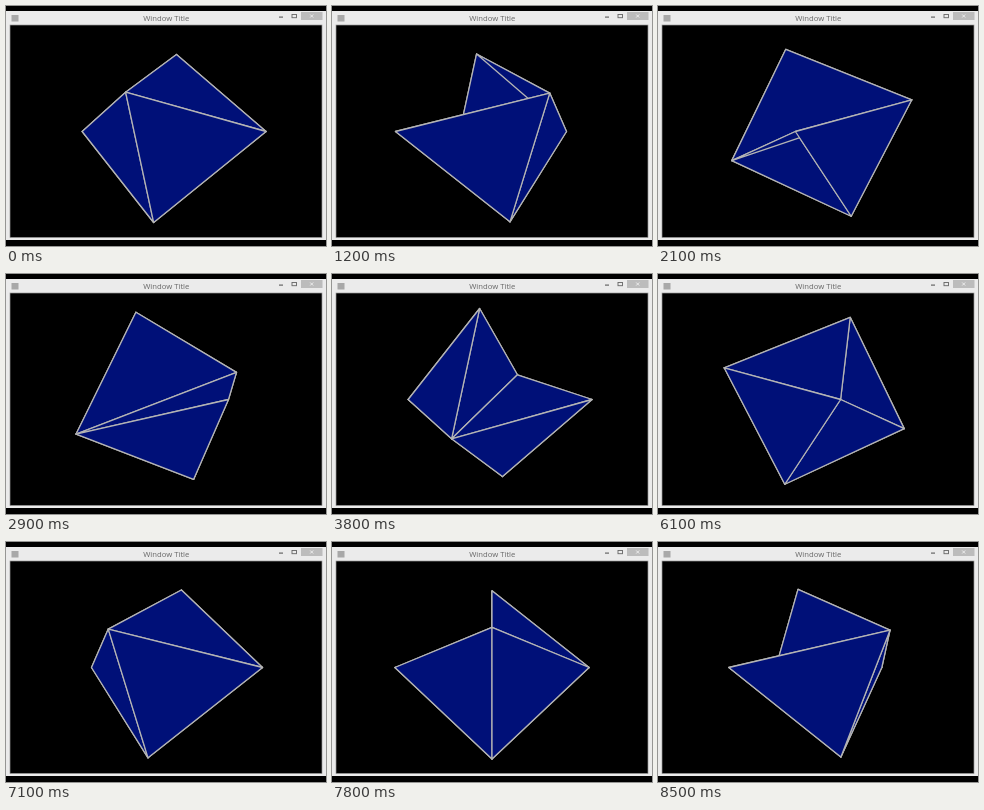
Write an HTML page that moves like this. It is 320x240 px and loops after 8600 ms.

```html
<!DOCTYPE html>
<html lang="en">
<head>
<meta charset="utf-8">
<title>Rotating solid</title>
<style>
  html, body { margin: 0; width: 100%; height: 100%; overflow: hidden; background: #000; }
  svg { display: block; width: 320px; height: 240px; }
  text { font: 7.7px "Open Sans", "Noto Sans", sans-serif; fill: #666; text-anchor: middle; }
  #solid { fill: #001078; stroke: #b4b4b4; stroke-width: 1.3; stroke-linejoin: round; }
</style>
</head>
<body>
<svg viewBox="0 0 320 240">
  <rect width="320" height="240"/>
  <rect y="5" width="320" height="229" fill="#ebebeb"/>
  <rect x="4" y="19" width="312" height="212.5" stroke="#999" stroke-width=".7"/>
  <rect x="5.5" y="9" width="7" height="6.5" fill="#a8a8a8"/>
  <text x="160.3" y="15.2">Window Title</text>
  <rect x="273" y="10.5" width="4" height="1.2" fill="#666"/>
  <rect x="286" y="8.5" width="4.5" height="3.2" fill="none" stroke="#666" stroke-width=".9"/>
  <rect x="295" y="6" width="21.5" height="8" fill="#bcbcbc"/>
  <path d="M304.2 8.5l3 3m0-3l-3 3" stroke="#eee"/>
  <g id="solid"></g>
</svg>
<script>
  const LOOP = 8600, STEP = 200, RAD = Math.PI / 180;
  const CAMERA = 3.88, SCALE_X = 97.1, SCALE_Y = 88.8;
  const CENTER_X = 160, CENTER_Y = 125.5;
  const tiltC = Math.cos(20 * RAD), tiltS = Math.sin(20 * RAD);

  // Octahedron corners, tilted 20 degrees about the x axis
  const corners = {
    A: [1, 0, 0], B: [-1, 0, 0],
    C: [0, -tiltC, -tiltS], D: [0, tiltC, tiltS],
    E: [0, -tiltS, tiltC], F: [0, tiltS, -tiltC]
  };
  const faces = ["CAE", "CAF", "DAE", "DAF", "DBE", "DBF", "CEF", "BEF"];
  const solid = document.getElementById("solid");
  let shown = null;

  function spin([x, y, z], a) {
    const c = Math.cos(a), s = Math.sin(a);
    return [x * c + z * s, y, z * c - x * s];
  }

  function project([x, y, z]) {
    const k = CAMERA / (CAMERA - z);
    return (CENTER_X + SCALE_X * x * k).toFixed(2) + "," + (CENTER_Y + SCALE_Y * y * k).toFixed(2);
  }

  // Distance from the camera to the middle of a face
  function distance(points) {
    const [x, y, z] = [0, 1, 2].map(i => points.reduce((sum, p) => sum + p[i], 0) / 3);
    return Math.hypot(x, y, CAMERA - z);
  }

  function draw(degrees) {
    solid.innerHTML = faces
      .map(face => [...face].map(name => spin(corners[name], degrees * RAD)))
      .sort((a, b) => distance(b) - distance(a))
      .map(points => `<polygon points="${points.map(project).join(" ")}"/>`)
      .join("");
  }

  function frame() {
    const t = performance.now() % LOOP;
    const degrees = -20 + 10 * Math.max(0, Math.floor((t - 100) / STEP));
    if (degrees !== shown) draw(shown = degrees);
    requestAnimationFrame(frame);
  }
  frame();
</script>
</body>
</html>
```
